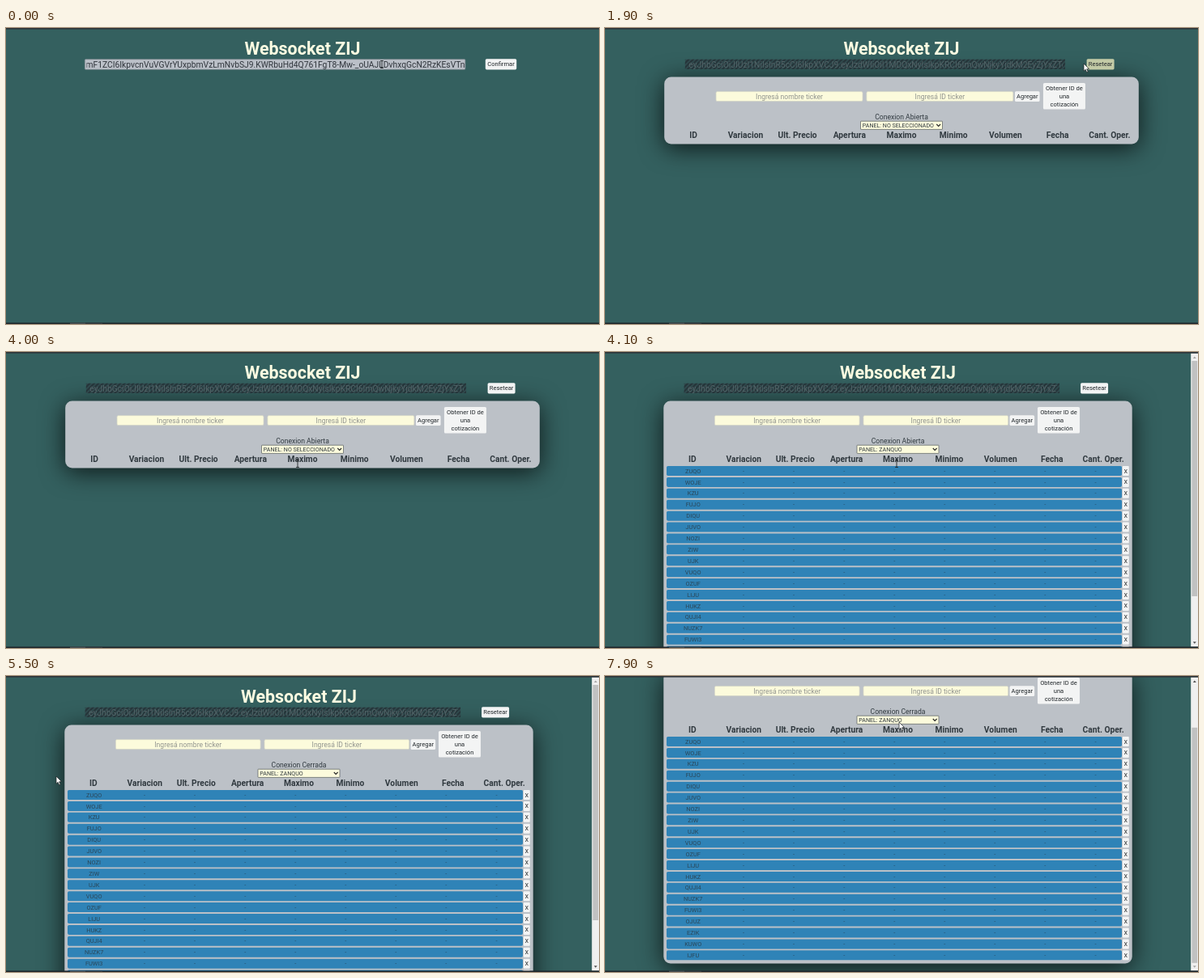
Recreate the animation shown at these times as an HTML page with a canvas. Size 732 px wide and 366 px high, loop 8000 ms.

```html
<!DOCTYPE html>
<html lang="es">
<head>
<meta charset="utf-8">
<title>Websocket ZIJ</title>
<style>
html, body { margin: 0; width: 100%; height: 100%; overflow: hidden; background: #34605f; }
canvas { display: block; width: 732px; height: 366px; }
</style>
</head>
<body>
<canvas id="stage"></canvas>
<script>
const W = 732, H = 366, LOOP = 8000, TICK = 100;
const OPEN_AT = 1400, FILL_AT = 4100, CLOSE_AT = 4900;
const SCROLL_FROM = 5600, SCROLL_TO = 5900, SCROLL_MAX = 66;

const canvas = document.getElementById('stage');
const ctx = canvas.getContext('2d');
const dpr = window.devicePixelRatio || 1;
canvas.width = W * dpr;
canvas.height = H * dpr;

const CREAM = '#fcfbdc', PANEL = '#bcc1c7', DARK = '#30393f';
const HEADS = ['ID', 'Variacion', 'Ult. Precio', 'Apertura', 'Maximo',
  'Minimo', 'Volumen', 'Fecha', 'Cant. Oper.'];
const TICKERS = ('ZUQO WOJE KZU FUJO DIQU JUVO NOZI ZIW UJK VUQO ' +
  'OZUF LIJU HUKZ QUJI4 NUZK7 FUWI3 OJUZ EZIK KUWO IJFU').split(' ');
const TOKEN_HEAD = 'eyJhbGciOiJIUzI1NiIsInR5cCI6IkpXVCJ9.eyJzdWIiOiI1MDQxNyIsIkpKRCI6ImQwNjkyYjdkM2EyZjYxZTci';
const TOKEN_TAIL = 'iSIsImF1ZCI6IkpvcnVuVGVrYUxpbmVzLmNvbSJ9.KWRbuHd4Q761FgT8-Mw-_oUAJLDvhxqGcN2RzKEsVTn';

// Pointer path: time, x, y
const PATH = [
  [0, 464, 45], [200, 464, 45], [950, 608, 44], [1400, 608, 44], [1900, 591, 44],
  [2300, 580, 50], [2800, 520, 88], [3400, 366, 121], [3700, 360, 138],
  [4300, 360, 138], [5500, 62, 124], [5800, 48, 120], [7050, 48, 120],
  [7850, 363, 57], [8000, 363, 57]
];

const ease = p => p * p * (3 - 2 * p);
const ramp = (t, a, b) => ease(Math.min(1, Math.max(0, (t - a) / (b - a))));

function pointerAt(t) {
  let i = 0;
  while (i < PATH.length - 2 && t >= PATH[i + 1][0]) i++;
  const [t0, x0, y0] = PATH[i], [t1, x1, y1] = PATH[i + 1];
  const p = ramp(t, t0, t1);
  return [x0 + (x1 - x0) * p, y0 + (y1 - y0) * p];
}

function rect(x, y, w, h, fill) {
  ctx.fillStyle = fill;
  ctx.fillRect(x, y, w, h);
}

function box(x, y, w, h, r, fill, stroke) {
  ctx.beginPath();
  ctx.roundRect(x, y, w, h, r);
  ctx.fillStyle = fill;
  ctx.fill();
  if (stroke) {
    ctx.strokeStyle = stroke;
    ctx.lineWidth = 0.7;
    ctx.stroke();
  }
}

function text(str, x, y, size, color = DARK, align = 'center', weight = 400) {
  ctx.font = `${weight} ${size}px Roboto, sans-serif`;
  ctx.textAlign = align;
  ctx.textBaseline = 'alphabetic';
  ctx.fillStyle = color;
  ctx.fillText(str, x, y + size * 0.355);
}

function poly(points, fill) {
  ctx.beginPath();
  points.forEach(([x, y]) => ctx.lineTo(x, y));
  ctx.closePath();
  ctx.fillStyle = fill;
  ctx.fill();
}

function clipTo(x, y, w, h, draw) {
  ctx.save();
  ctx.beginPath();
  ctx.rect(x, y, w, h);
  ctx.clip();
  draw();
  ctx.restore();
}

function button(label, cx, y, w, h, hover) {
  box(cx - w / 2, y, w, h, 1.6, hover ? '#c3cba6' : '#f3f4f4');
  const lines = label.split('\n');
  lines.forEach((line, i) =>
    text(line, cx, y + h / 2 + (i - (lines.length - 1) / 2) * 9.6, 7.55, '#20262a'));
}

function tokenField() {
  box(97.3, 38.7, 469.6, 12.6, 1, '#bbc0c8', '#7d878e');
  clipTo(99.5, 38.7, 467.2, 12.6, () =>
    text(TOKEN_TAIL, 566.5, 45, 10.3, '#30353c', 'right'));
}

function lockedField(cx, pageW) {
  const x = cx - 0.365 * pageW, w = 0.641 * pageW;
  clipTo(x, 38.7, w, 12.4, () => {
    rect(x, 38, w, 14, '#304a4d');
    ctx.beginPath();
    for (let sx = x - 14; sx < x + w; sx += 5.4) {
      ctx.moveTo(sx, 52);
      ctx.lineTo(sx + 14, 38);
    }
    ctx.strokeStyle = '#26353a';
    ctx.lineWidth = 2;
    ctx.stroke();
  });
  clipTo(x + 4, 38.7, w - 7, 12.4, () =>
    text(TOKEN_HEAD, x + 4.5, 45, 10.3, '#536468', 'left'));
}

function select(label, cx) {
  box(cx - 50.5, 115.2, 101, 10.2, 0.5, CREAM, '#555b5c');
  text(label, cx - 48.2, 120.5, 7.1, DARK, 'left');
  ctx.beginPath();
  ctx.moveTo(cx + 43.3, 119);
  ctx.lineTo(cx + 45.7, 121.4);
  ctx.lineTo(cx + 48.1, 119);
  ctx.strokeStyle = '#222';
  ctx.lineWidth = 1.1;
  ctx.stroke();
}

function rows() {
  TICKERS.forEach((name, i) => {
    const y = 147 + i * 13.91;
    box(76, y - 6, 562, 12, 1.8, '#2f83b7');
    text(name, 108.7, y, 7.4, '#2b4759');
    for (let c = 1; c < 9; c++) text('-', 109 + c * 62.05, y, 7.4, '#294e66');
    box(638.8, y - 6, 8, 12, 1, '#f3f4f4');
    text('X', 642.8, y, 7.2, '#20262a');
  });
}

function panel(t, cx, pageW, filled) {
  const w = pageW * 0.8, x = cx - w / 2;
  ctx.save();
  ctx.shadowColor = 'rgba(0,0,0,.75)';
  ctx.shadowBlur = 30 * dpr;
  ctx.shadowOffsetY = 5 * dpr;
  box(x, 60.4, w, filled ? 361 : 83.2, 8.5, PANEL);
  ctx.restore();

  const inW = 0.2473 * pageW, inX = cx - 0.3128 * pageW;
  ['Ingresá nombre ticker', 'Ingresá ID ticker'].forEach((hint, i) => {
    const fx = inX + i * (inW + 4.8);
    box(fx, 78.6, inW, 12, 1.6, CREAM, '#d2d3c5');
    text(hint, fx + inW / 2, 84.6, 8.57, '#92958f');
  });
  button('Agregar', cx + 0.2121 * pageW, 78.2, 30.6, 12.8);
  button('Obtener ID de\nuna\ncotización', cx + 0.2745 * pageW, 68, 52, 32.6);

  text(t < CLOSE_AT ? 'Conexion Abierta' : 'Conexion Cerrada', cx, 109.7, 8.6);
  select(filled ? 'PANEL: ZANQUO' : 'PANEL: NO SELECCIONADO', cx);
  const step = filled ? 63.4 : 64.2;
  HEADS.forEach((h, i) => text(h, cx + (i - 4) * step, 132, 10.25, DARK, 'center', 700));
  if (filled) rows();
}

function scrollbar(scroll) {
  rect(723.2, 1.5, 9, 363, '#f0f0f0');
  rect(724.4, 11 + scroll * 0.8, 6.8, 291, '#c0c1c1');
  const off = '#a5a5a5', on = '#505050';
  poly([[725.8, 8], [727.8, 5.5], [729.8, 8]], scroll > 0 ? on : off);
  poly([[725.8, 358.2], [727.8, 360.7], [729.8, 358.2]], scroll < SCROLL_MAX ? on : off);
}

function frameEdges() {
  rect(0, 0, W, 1.6, '#2e3338');
  rect(0, 364.4, W, 1.6, '#20272b');
  rect(79, 364.6, 19, 1.4, '#4b5154');
  rect(98, 364.6, 21, 1.4, '#353b3f');
}

function arrow(x, y) {
  ctx.beginPath();
  [[0, 0], [0, 9.2], [2.1, 7.3], [3.7, 10.8], [5.2, 10.1], [3.7, 6.8], [6.5, 6.5]]
    .forEach(([dx, dy]) => ctx.lineTo(x + dx, y + dy));
  ctx.closePath();
  ctx.fillStyle = '#fff';
  ctx.fill();
  ctx.strokeStyle = '#1c2022';
  ctx.lineWidth = 0.7;
  ctx.stroke();
}

function beam(x, y) {
  ctx.beginPath();
  ctx.moveTo(x, y - 4.5);
  ctx.lineTo(x, y + 4.5);
  for (const dy of [-4.5, 4.5]) {
    ctx.moveTo(x - 1.8, y + dy);
    ctx.lineTo(x + 1.8, y + dy);
  }
  ctx.strokeStyle = '#202428';
  ctx.lineWidth = 0.9;
  ctx.stroke();
}

function pointer(t) {
  const [x, y] = pointerAt(t);
  const overField = t < OPEN_AT && x < 567;
  const overHeads = t >= 3600 && t < 4500 && y > 126;
  (overField || overHeads ? beam : arrow)(x, y);
}

function draw(t) {
  const open = t >= OPEN_AT, filled = t >= FILL_AT;
  const pageW = filled ? 723 : W, cx = pageW / 2;
  const scroll = SCROLL_MAX * ramp(t, SCROLL_FROM, SCROLL_TO);
  const hover = t >= 900 && t <= 2000;

  ctx.setTransform(dpr, 0, 0, dpr, 0, 0);
  rect(0, 0, W, H, '#34605f');
  ctx.save();
  ctx.translate(0, -scroll);
  if (open) panel(t, cx, pageW, filled);
  text('Websocket ZIJ', cx, 25, 21.43, '#fdfde2', 'center', 700);
  if (open) {
    lockedField(cx, pageW);
    button('Resetear', cx + 0.3355 * pageW, 38.2, 34, 13.2, hover);
  } else {
    tokenField();
    button('Confirmar', 611, 38.2, 38.4, 13.2, hover);
  }
  ctx.restore();
  if (filled) scrollbar(scroll);
  frameEdges();
  pointer(t);
}

const start = performance.now();
function loop() {
  const t = (performance.now() - start) % LOOP;
  draw(Math.floor(t / TICK) * TICK);
  requestAnimationFrame(loop);
}
loop();
</script>
</body>
</html>
```
